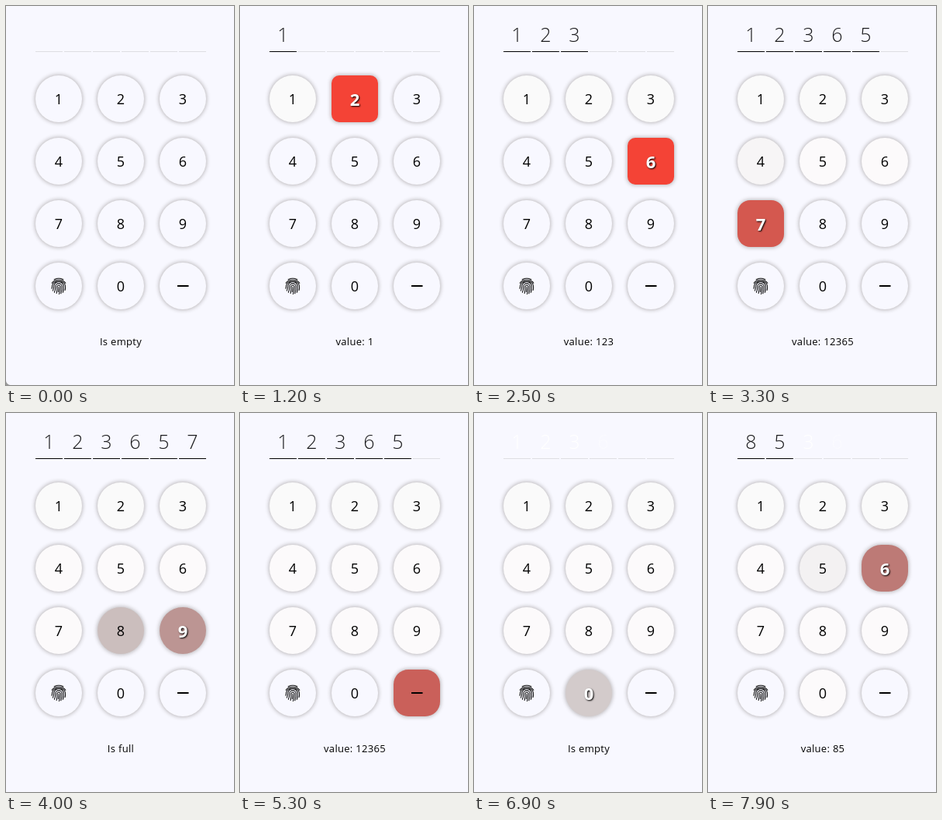
Animation, 294 px wide and 486 px high, one loop 8000 ms. Source, as an HTML page:

```html
<!DOCTYPE html>
<html lang="en">
<head>
<meta charset="utf-8">
<title>PIN pad</title>
<style>
  html, body { margin: 0; width: 100%; height: 100%; overflow: hidden; background: #f8f8ff; }
  body { position: relative; font-family: "Open Sans", "Noto Sans", sans-serif; color: #000; }
  .slot {
    position: absolute; top: 21px; width: 35px; height: 37px;
    border-bottom: 1px solid #dedee2;
    font-size: 25px; font-weight: 300; line-height: 30px; text-align: center; color: #fff;
  }
  .slot.on { border-color: #000; color: #1c1c1e; }
  .key {
    position: absolute; width: 60px; height: 60px;
    box-shadow: 0 0 5px 1px rgba(60, 50, 40, .32);
    font-size: 18px; line-height: 60px; text-align: center;
  }
  .key.hover { font-size: 22px; font-weight: 700; color: #fff; text-shadow: 1px 1px 2px #000; }
  .key svg { display: block; fill: none; stroke: #111; stroke-linecap: round; }
  #status {
    position: absolute; top: 420px; left: 0; width: 296px;
    font-size: 13px; line-height: 20px; letter-spacing: .3px; text-align: center; white-space: pre;
  }
  #corner {
    position: absolute; left: 0; bottom: 0; width: 6px; height: 6px;
    background: radial-gradient(circle at 100% 0, transparent 5.5px, #999 6.5px);
  }
</style>
</head>
<body>
<div id="status"></div>
<div id="corner"></div>
<script>
const LOOP = 8000, FADE = 300;
const RED = [244, 67, 54], PAGE = [248, 248, 255];

const ICONS = {
  print: `<svg width="60" height="60" viewBox="-30 -30.5 60 60" stroke-width="1.1">
    <path d="M-5.8-8.8Q0-11.6 5.8-8.8M-8.8-4.2C-5.5-9.6 5.5-9.6 8.8-4.2
      M-9 2.8Q-8.4 1-8.4-1C-7-8.4 7-8.4 8.4-1Q8.9 2 8.2 5
      M-7.6 5.6Q-6.3 2.6-6.3 0A6.3 6 0 0 1 6.3 0Q6.6 4 5.4 7.8
      M-5.6 7.8Q-4.2 4-4.2.4A4.2 4 0 0 1 4.2.4Q4.5 5 2.8 9.3
      M-2.8 9Q-1.9 5-2.1.8A2.1 2 0 0 1 2.1.8Q2.3 5 .4 9.9M0 1Q.2 4-.6 7"/></svg>`,
  minus: `<svg width="60" height="60" viewBox="-30 -30 60 60" stroke-width="2">
    <path stroke="#000" stroke-linecap="butt" d="M-7 0H7.5"/></svg>`
};

// Pointer visits: key, enter, leave, clicks
const VISITS = [
  ['1', 450, 890, 780], ['2', 880, 1490, 1400], ['3', 1500, 2180, 2000],
  ['6', 2190, 2680, 2600], ['5', 2690, 2980, 2900], ['4', 3000, 3130],
  ['7', 3140, 3500, 3400], ['8', 3740, 3900], ['9', 3919, 4450],
  ['minus', 4460, 6140, 5300, 5800, 6050], ['0', 6854, 6985],
  ['8', 7000, 7330, 7250], ['5', 7310, 7755, 7600], ['6', 7795, LOOP]
];

// When the entered value changes
const VALUES = [
  [0, ''], [780, '1'], [1400, '12'], [2000, '123'], [2600, '1236'], [2900, '12365'],
  [3400, '123657'], [5300, '12365'], [5800, '1236'], [6050, '123'], [6500, '12'],
  [6700, '1'], [6800, ''], [7250, '8'], [7600, '85']
];

function add(cls, x, y) {
  const el = document.createElement('div');
  el.className = cls;
  el.style.left = x + 'px';
  if (y) el.style.top = y + 'px';
  document.body.append(el);
  return el;
}

const slots = Array.from({ length: 6 }, (_, i) => add('slot', 38 + 37 * i));

const keys = ['1', '2', '3', '4', '5', '6', '7', '8', '9', 'print', '0', 'minus'].map((name, i) => {
  const row = Math.floor(i / 3);
  const el = add('key', 38 + 80 * (i % 3), 89 + 80 * row);
  el.innerHTML = ICONS[name] || name;
  const visits = VISITS.filter(v => v[0] === name);
  const toggles = visits.flatMap(([, enter, leave, ...clicks]) => [
    [enter, 1],
    ...clicks.flatMap(c => [[c - 50, 0], [Math.min(c + 80, leave), 1]]),
    [leave, 0]
  ]);
  const used = name === 'minus' ? PAGE : row ? [252, 250, 251] : [250, 250, 250];
  return { el, visits, toggles, used };
});

// The CSS "ease" curve
function ease(x) {
  if (x <= 0) return 0;
  if (x >= 1) return 1;
  let lo = 0, hi = 1, s = .5;
  for (let i = 0; i < 20; i++) {
    s = (lo + hi) / 2;
    if (.75 * s * (1 - s) + s ** 3 < x) lo = s; else hi = s;
  }
  return .3 * s * (1 - s) ** 2 + 3 * s * s * (1 - s) + s ** 3;
}

// Reversed transitions take proportionally less time
function level(toggles, t) {
  let from = 0, to = 0, start = 0;
  const at = now => to === from ? to
    : from + (to - from) * ease((now - start) / (FADE * Math.abs(to - from)));
  for (const [time, target] of toggles) {
    if (time > t) break;
    from = at(time);
    to = target;
    start = time;
  }
  return at(t);
}

function drawKey({ el, visits, toggles, used }, t) {
  const p = level(toggles, t);
  const base = visits.length && t >= visits[0][1] ? used : PAGE;
  const rgb = base.map((c, i) => c * (1 - p) + RED[i] * p * p);
  el.style.background = `rgb(${rgb.map(Math.round)})`;
  el.style.borderRadius = Math.min(30, 50 - 40 * p) + 'px';
  el.classList.toggle('hover', visits.some(v => t >= v[1] && t < v[2]));
}

function drawValue(t) {
  const past = VALUES.filter(v => v[0] <= t).map(v => v[1]);
  const value = past[past.length - 1];
  slots.forEach((slot, i) => {
    const on = i < value.length;
    // Erased digits leave a pale trace in the first four slots
    const trace = i < 4 ? past.filter(v => v.length > i).pop() : '';
    slot.textContent = on ? value[i] : trace ? trace[i] : '';
    slot.classList.toggle('on', on);
    slot.style.color = !on && i === 3 ? 'rgba(255,255,255,.4)' : '';
  });
  document.getElementById('status').textContent =
    !value ? 'Is empty' : value.length === 6 ? 'Is full' : 'value: ' + value;
}

const origin = performance.now();
function draw() {
  const t = (performance.now() - origin) % LOOP;
  keys.forEach(key => drawKey(key, t));
  drawValue(t);
  document.getElementById('corner').hidden = t >= 500;
  requestAnimationFrame(draw);
}
draw();
</script>
</body>
</html>
```
